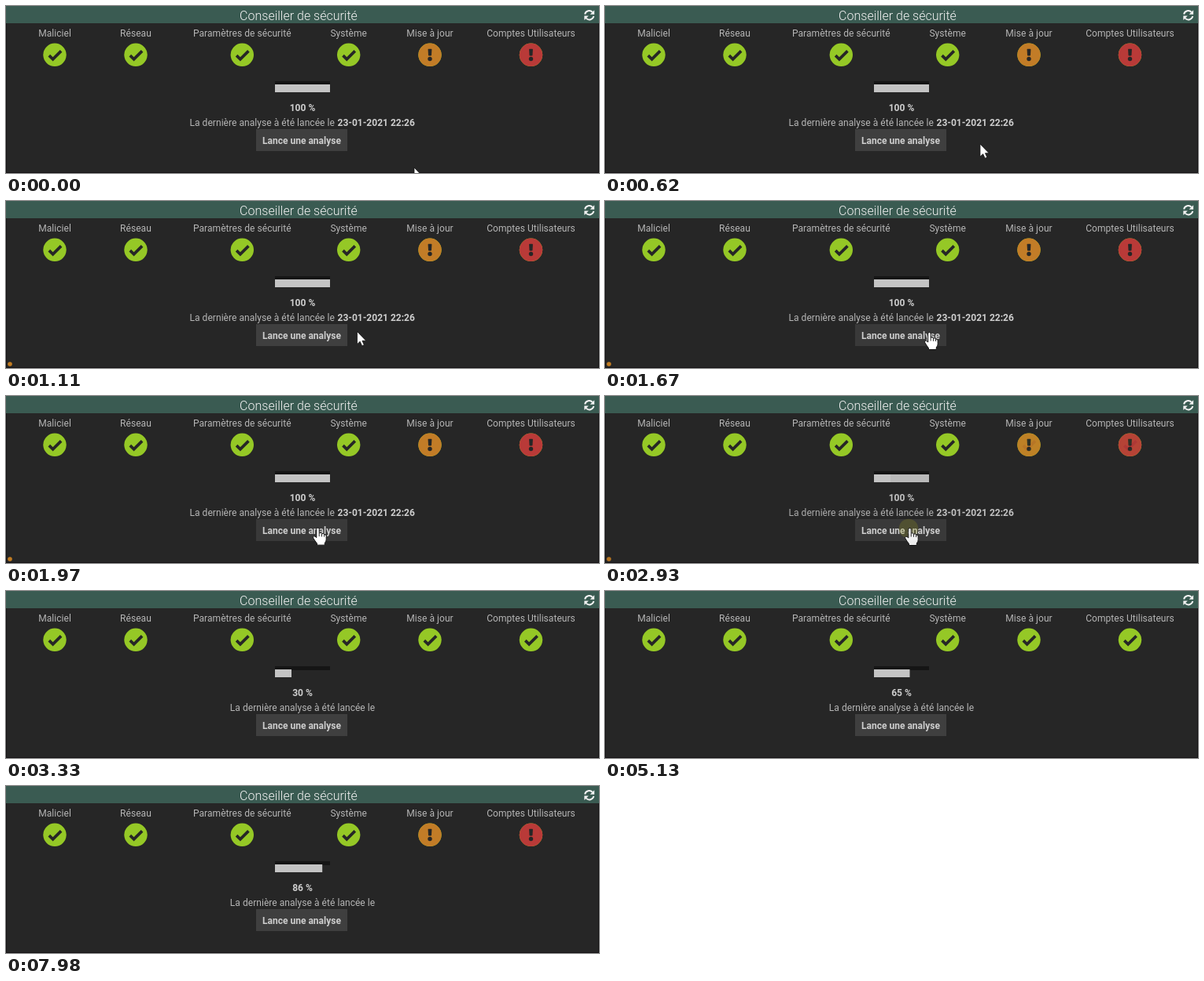
These frames come from a looping animation (754x213 px, 8000 ms). An HTML page:

```html
<!DOCTYPE html>
<html lang="fr">
<head>
<meta charset="utf-8">
<title>Conseiller de sécurité</title>
<style>
html, body { margin: 0; width: 100%; height: 100%; overflow: hidden; background: #262626; }
svg { display: block; width: 754px; height: 213px; }
text { font: 400 12px Roboto, Arial, sans-serif; fill: #b6b6b6; }
.label { letter-spacing: .05px; }
.bold { font-weight: 700; fill: #cecece; }
.title { font-size: 16px; font-weight: 300; fill: #f2f2f2; }
.mid { text-anchor: middle; }
</style>
</head>
<body>
<svg viewBox="0 0 754 213">
  <defs>
    <g id="ok">
      <circle r="14.7" fill="#95c826"/>
      <path d="M-7.2 .8L-2.4 5.6L8.1-4.9" fill="none" stroke="#262626" stroke-width="3.7"/>
    </g>
    <g id="bang" fill="#262626">
      <path d="M-1.7-7.6H1.7Q2.5-7.6 2.4-6.8L2 .4Q1.9 1.1 1.2 1.1H-1.2Q-1.9 1.1-2 .4L-2.4-6.8Q-2.5-7.6-1.7-7.6Z"/>
      <circle cy="5.2" r="2.7"/>
    </g>
    <g id="turn">
      <path d="M-5.6-1.2A5.6 5.6 0 0 1 4-3.9" fill="none" stroke="#f4f4f4" stroke-width="2"/>
      <path d="M6.4-6.4V-.9H.9Z" fill="#f4f4f4"/>
    </g>
  </defs>

  <rect width="754" height="213" fill="#262626"/>
  <rect width="754" height="22" fill="#3a5b52"/>
  <path d="M.5 22V212.5H753.5V22" fill="none" stroke="#151315"/>
  <text class="title mid" x="372" y="18">Conseiller de sécurité</text>
  <g transform="translate(741.7 11.7)">
    <use href="#turn"/>
    <use href="#turn" transform="rotate(180)"/>
  </g>

  <g id="checks"></g>
  <g id="alerts">
    <g transform="translate(539 62.3)"><circle r="14.7" fill="#c27c27"/><use href="#bang"/></g>
    <g transform="translate(667.5 62.3)"><circle r="14.7" fill="#b93a38"/><use href="#bang"/></g>
  </g>

  <rect x="342" y="96" width="70" height="5" fill="#151515"/>
  <rect id="bar" x="342" y="100" height="10" fill="#c4c4c4"/>
  <rect id="fullBar" x="342" y="100" width="70" height="10" fill="#c4c4c4"/>
  <rect id="button" x="318" y="157" width="116" height="28"/>
  <text class="bold mid" x="376" y="176">Lance une analyse</text>

  <g id="done">
    <text class="bold mid" x="377" y="134">100 %</text>
    <text class="label" x="233.5" y="153">La dernière analyse à été lancée le</text>
    <text class="bold" x="421.5" y="153">23-01-2021 22:26</text>
  </g>
  <g id="running">
    <text id="percent" class="bold mid" x="377" y="134"></text>
    <text class="label mid" x="377" y="153">La dernière analyse à été lancée le</text>
  </g>

  <g id="overlay">
    <circle id="dot" cx="5" cy="208" r="2.8" fill="#c27c22"/>
    <circle id="click" cx="386" cy="169" r="12.3" fill="#a09d1c"/>
    <path id="arrow" d="M0 0V16.2L3.7 12.8L6.2 18.3L8.9 17.1L6.5 11.8H11.3Z" fill="#fff" stroke="#111" stroke-width=".8"/>
    <g id="hand" stroke="#111" stroke-linejoin="round">
      <path d="M-1.7 13V2Q-1.7 .5 0 .5Q1.7 .5 1.7 2V7Q4.6 6.2 5 8Q7.7 7.3 8.1 9Q10.7 8.6 10.7 11V15.5Q10.7 17.5 8.8 20V22.5H-1V20.5Q-3.5 17.5-5.6 13.8Q-6.6 11.8-5 11.2Q-3.6 10.8-1.7 13Z" fill="#fff"/>
      <path d="M1.7 7V11.5M5 8V11.8M8.1 9V12" fill="none" stroke-width=".9"/>
    </g>
  </g>
</svg>
<script>
const LOOP = 8000;
const FADE = [2900, 3330];
const el = id => document.getElementById(id);
const clamp = v => Math.max(0, Math.min(1, v));
const ramp = (t, a, b) => clamp((t - a) / (b - a));
const show = (id, alpha) => el(id).setAttribute('opacity', +alpha);

const columns = [
  ['Maliciel', 62], ['Réseau', 165], ['Paramètres de sécurité', 300.3],
  ['Système', 435.7], ['Mise à jour', 539], ['Comptes Utilisateurs', 667.5]
];
el('checks').innerHTML = columns.map(([name, x]) =>
  `<text class="label mid" x="${x}" y="39">${name}</text>
   <use href="#ok" transform="translate(${x} 62.3)"/>`).join('');

// time, x, y of the pointer's tip
const path = [
  [0, 519, 206], [70, 518, 205], [620, 477, 176], [860, 465, 167], [940, 464, 166],
  [1340, 423, 167], [1460, 423, 167], [1670, 412.5, 167], [2140, 387.5, 168]
];

function pointer(t) {
  const i = path.findIndex(p => p[0] > t);
  if (i < 0) return path[path.length - 1].slice(1);
  const [a, b] = [path[i - 1], path[i]];
  const k = ramp(t, a[0], b[0]);
  return [a[1] + (b[1] - a[1]) * k, a[2] + (b[2] - a[2]) * k];
}

function draw(t) {
  const fade = ramp(t, ...FADE);
  const percent = t < 5130 ? 30 : t < 7980 ? 65 : 86;
  const [x, y] = pointer(t);
  const hover = x < 434;

  show('done', 1 - fade);
  show('running', fade);
  show('fullBar', 1 - fade);
  show('overlay', 1 - fade);
  show('alerts', t >= 7980 ? 1 : 1 - fade);
  el('percent').textContent = percent + ' %';
  el('bar').setAttribute('width', 70 * percent / 100);
  el('button').setAttribute('fill', hover && fade < .5 ? '#393939' : '#3f3f3f');

  show('dot', t >= 1100);
  show('click', t < 2620 ? 0 : 1 - ramp(t, 2730, 3000));
  show('arrow', !hover);
  show('hand', hover);
  for (const id of ['arrow', 'hand']) el(id).setAttribute('transform', `translate(${x} ${y})`);
}

const start = performance.now();
function tick() {
  draw((performance.now() - start) % LOOP);
  requestAnimationFrame(tick);
}
tick();
</script>
</body>
</html>
```
